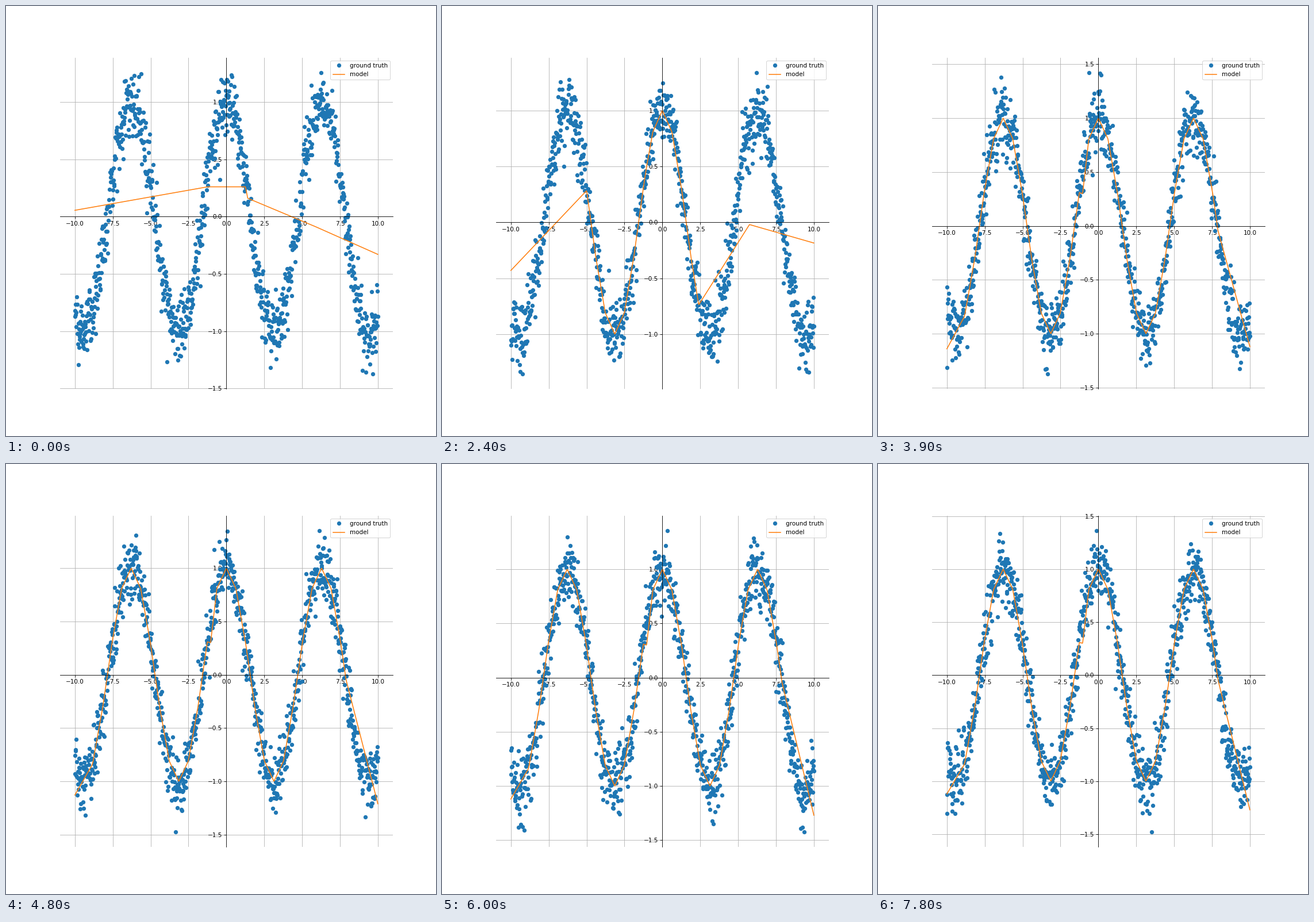
A matplotlib script for the animation above (8 s loop, 748x748 px).

```python
import numpy as np
import matplotlib.pyplot as plt
from matplotlib.animation import FuncAnimation

SIZE = 748
INCHES = 10
FRAME_MS = 100
FRAMES = 80
FRAMES_PER_STEP = 3
NOISE = 0.15
MARGIN = 0.05
EDGE = 10
ELBOW_X = 5.75
KINK_X = -1.04

x = np.linspace(-EDGE, EDGE, 1000)
wave_knots = np.arange(-15, 16) * np.pi / 5

# The model follows the cosine between left and right, up to its ceiling,
# and runs straight from there to the edges.
# step, left, right, left edge y, right edge y, elbow y, kink y, ceiling
STAGES = np.array([
    (0, -1.31, 1.41, .055, -.33, -.08, .26, .26),
    (4, -1.60, 1.66, -.34, -.28, -.155, .42, .95),
    (8, -5.00, 2.40, -.43, -.185, -.02, .50, 1),
    (13, -8.86, 7.90, -1.14, -1.12, .96, .30, 1),
    (18, -8.86, 7.90, -1.12, -1.27, .96, .30, 1),
])


def samples(step):
    rng = np.random.default_rng(step)
    return np.cos(x) + rng.normal(0, NOISE, x.size)


def prediction(step):
    left, right, left_y, right_y, elbow_y, kink_y, ceiling = (
        np.interp(step, STAGES[:, 0], column) for column in STAGES.T[1:])
    inside = wave_knots[(wave_knots > left) & (wave_knots < right)]
    inside = np.concatenate(([left], inside, [right]))
    knots = list(zip(inside, np.minimum(np.cos(inside), ceiling)))
    knots += [(-EDGE, left_y), (KINK_X, kink_y), (EDGE, right_y)]
    if right < ELBOW_X:
        knots.append((ELBOW_X, elbow_y))
    return np.interp(x, *zip(*sorted(knots)))


fig, ax = plt.subplots(figsize=(INCHES, INCHES), dpi=SIZE / INCHES)
dots, = ax.plot(x, samples(0), "o", label="ground truth")
line, = ax.plot(x, prediction(0), label="model")
for side in ("left", "bottom"):
    ax.spines[side].set_position("zero")
for side in ("right", "top"):
    ax.spines[side].set_visible(False)
ax.set_xticks(np.arange(-10, 10.1, 2.5))
ax.set_yticks(np.arange(-1.5, 1.6, 0.5))
ax.set_xlim(-11, 11)
ax.grid(True)
ax.legend(loc="upper right")


def update(frame):
    step = frame // FRAMES_PER_STEP
    y, model = samples(step), prediction(step)
    dots.set_ydata(y)
    line.set_ydata(model)
    lo, hi = min(y.min(), model.min()), max(y.max(), model.max())
    pad = MARGIN * (hi - lo)
    ax.set_ylim(lo - pad, hi + pad)
    return dots, line


anim = FuncAnimation(fig, update, frames=FRAMES, interval=FRAME_MS,
                     repeat=True, repeat_delay=0)
plt.show()
```
